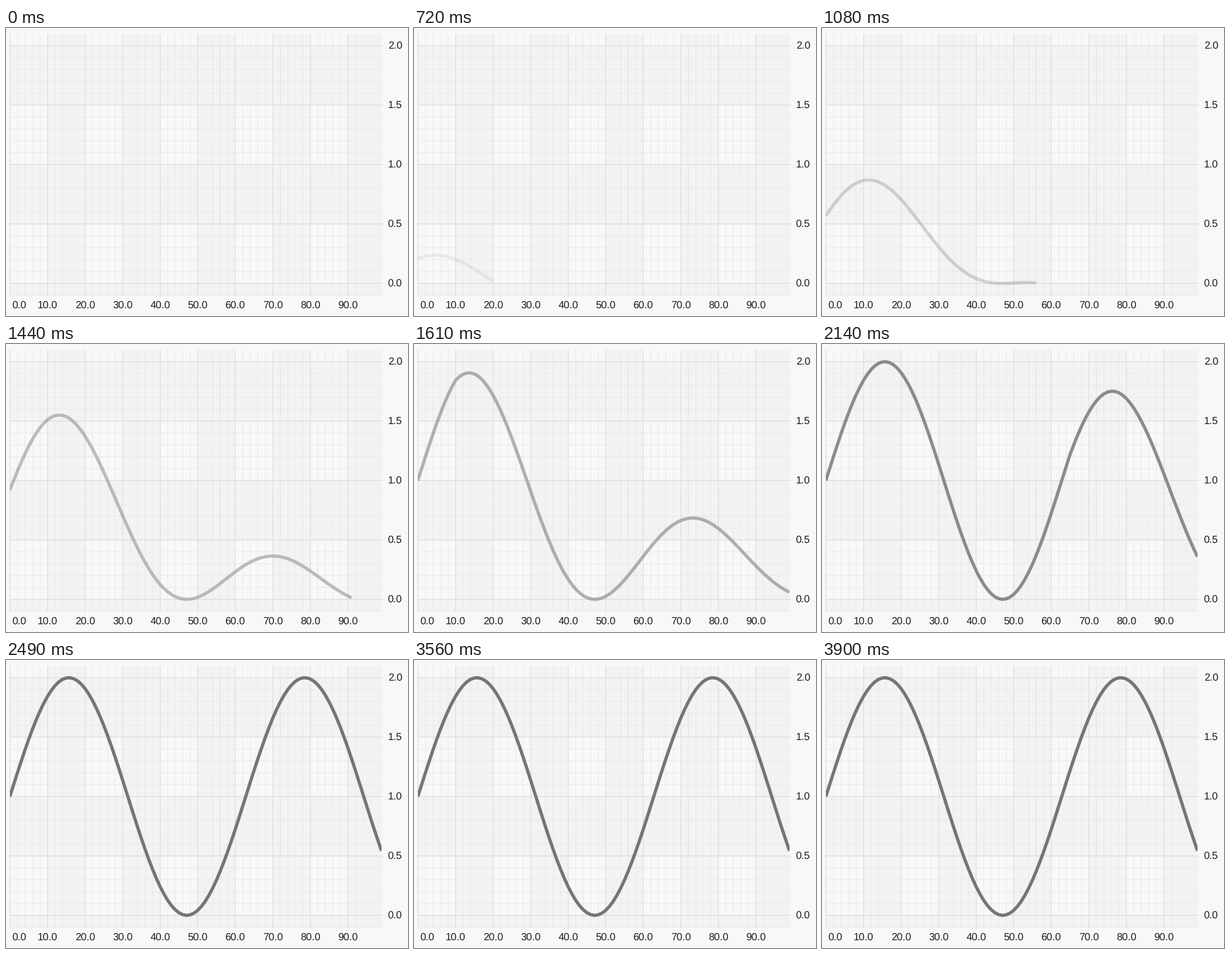
These frames come from a looping animation (623 px wide and 446 px high, 4.26 s). A matplotlib script:

```python
import numpy as np
import matplotlib.pyplot as plt
from matplotlib.animation import FuncAnimation
from matplotlib.collections import LineCollection
from matplotlib.patches import Rectangle

W, H, DPI = 623, 446, 100
LOOP, TICK = 4260, 10
LEFT, RIGHT, TOP, BOTTOM = 6, 583, 9, 415
PT = 72 / DPI

plt.rcParams["font.family"] = "Liberation Sans"
plt.rcParams["text.hinting"] = "none"
fig = plt.figure(figsize=(W / DPI, H / DPI), dpi=DPI, facecolor="#f8f8f8")
ax = fig.add_axes([0, 0, 1, 1])
ax.set_xlim(0, W)
ax.set_ylim(H, 0)
ax.axis("off")


def px(x):
    return LEFT + 576 / 99 * x


def py(y):
    return 395.4 - 184 * y


def band(x0, y0, x1, y1):
    ax.add_patch(Rectangle((x0, y0), x1 - x0, y1 - y0, fc="#f3f3f3", lw=0,
                           antialiased=False))


def lines(segments, color):
    ax.add_collection(LineCollection(segments, colors=color, linewidths=PT,
                                     snap=False))


def vertical(x, y0=TOP, y1=BOTTOM):
    return [(px(x) + 0.25, y0), (px(x) + 0.25, y1)]


def horizontal(y, x1=RIGHT):
    return [(LEFT, py(y)), (x1, py(y))]


# Alternating background bands
for x in range(10, 100, 20):
    band(int(px(x)), TOP, min(int(px(x + 10)), RIGHT), BOTTOM)
for y in (-0.5, 0.5, 1.5):
    band(LEFT, int(py(y + 0.5)), RIGHT, min(int(py(y)), BOTTOM))

# Grid
lines([vertical(x) for x in range(0, 100, 2)], "#eaeaea")
lines([horizontal(k / 10) for k in range(-1, 21)], "#eaeaea")
lines([vertical(x, py(y + 0.5), py(y))
       for x in (54, 56, 72) for y in (0.5, 1.5)], "#e4e4e4")
lines([vertical(x) for x in range(0, 100, 10)], "#dddddd")
lines([horizontal(k / 2, RIGHT + 1) for k in range(5)], "#dadada")
lines([[(618, 9.5 + 40.5 * k), (620, 9.5 + 40.5 * k)]
       for k in range(1, 11)], "#e6e6e6")

# Labels
style = dict(fontsize=16 * PT, color="#1c1c1c", va="baseline")
for x in range(0, 100, 10):
    ax.text(px(x) if x else 21, 434, f"{x:.1f}", ha="center", **style)
for k in range(5):
    ax.text(603, py(k / 2) + 4.6, f"{k / 2:.1f}", ha="center", **style)

curve, = ax.plot([], [], color="#757575", lw=5 * PT,
                 solid_capstyle="butt", solid_joinstyle="round")
curve.set_clip_path(Rectangle((LEFT, TOP), 576, BOTTOM - TOP,
                              transform=ax.transData))

# The picture refreshes in uneven steps
holds = [90] * 8 + [80] + [90] * 4 + [80] + [90] * 4 + [80, 90]
steps = 720 + np.cumsum([0] + holds)
index = np.arange(100)
wave = 1 + np.sin(index / 10)


def ticks_at(t):
    """Each tick starts one more point and lifts started ones by 1 %."""
    shown = steps[steps <= t]
    if not len(shown):
        return 0
    return round(float(np.interp(shown[-1], [720, 1080, 1440, 2140, 2490],
                                 [21, 57, 92, 165, 200])))


def draw(frame):
    n = ticks_at(frame * TICK)
    i = index[:n]
    grow = np.clip((n - i) / 100, 0, 1)
    curve.set_data(px(i), py(wave[:n] * grow))
    curve.set_alpha(n / 200)
    return curve,


anim = FuncAnimation(fig, draw, frames=LOOP // TICK, interval=TICK,
                     init_func=lambda: draw(0), repeat=True, repeat_delay=0)
plt.show()
```
